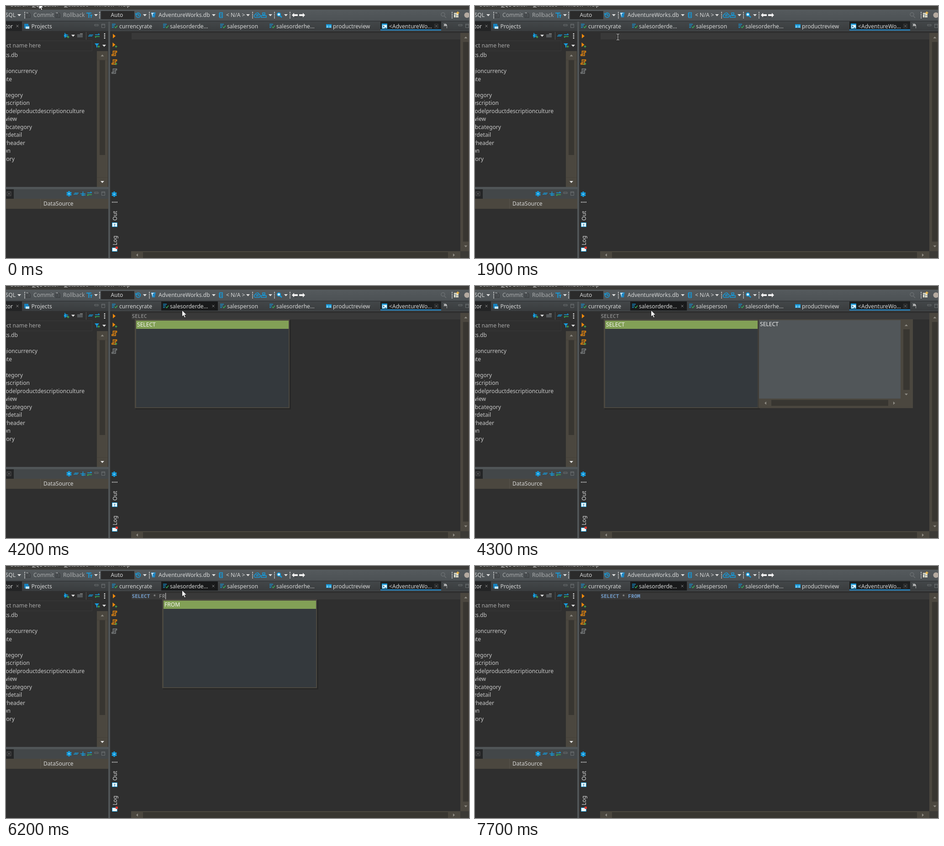
Recreate the animation shown at these times as an HTML page. Size 1014 by 553 pixels, loop 8 s.

```html
<!DOCTYPE html>
<html lang="en">
<head>
<meta charset="utf-8">
<title>SQL editor completion</title>
<style>
  html, body { margin: 0; width: 100%; height: 100%; overflow: hidden; background: #2f2f2f; }
  svg { display: block; width: 100%; height: 100%; }
  text { font: 12.1px "Noto Sans", "Open Sans", sans-serif; fill: #d6d7d7; white-space: pre; }
  .code { font: 11.08px "Noto Sans Mono", "DejaVu Sans Mono", monospace; fill: #a5a5a5; }
  .key { font-weight: 700; fill: #729bc8; }
  .dim { fill: #a9abac; }
  .tree text { text-anchor: end; fill: #c9c9c9; }
  .line { fill: none; stroke-width: 1.5; }
  .blue { stroke: #159bdc; }
  .gray { stroke: #6c7072; }
  .track { fill: #4b473f; }
  .thumb { fill: #383631; }
</style>
</head>
<body>
<svg viewBox="0 0 1014 553" preserveAspectRatio="none">
  <defs>
    <linearGradient id="bar" x2="0" y2="1"><stop stop-color="#555a5d"/><stop offset="1" stop-color="#4c5154"/></linearGradient>
    <linearGradient id="strip" x2="0" y2="1"><stop stop-color="#434749"/><stop offset="1" stop-color="#393c3e"/></linearGradient>
    <path id="down" d="M-4-2h8l-4 4.5z" fill="#e4e4e4"/>
    <path id="dots" d="M0-7V8" stroke="#d4d5d5" stroke-width="2" stroke-dasharray="2 2"/>
    <g id="minmax" class="line gray" style="stroke-width:1"><path d="M-4-3.5h8v3h-8z"/><path d="M11.500-4.500h7v8h-7zM11.500-2.500h7"/></g>
    <path id="close" d="M-2.500-2.500l5 5m0-5l-5 5" stroke="#858585"/>
    <g id="check" class="line"><path class="blue" d="M0-4h8M0-.5h6M0 3h4"/><path d="M6 2l2 2 4-5" stroke="#35b45a"/></g>
    <g id="gear" fill="#159bdc"><circle r="4.500"/><path d="M0-6V6M-5.200-3L5.200 3M-5.200 3L5.200-3" class="blue" stroke-width="3"/><circle r="1.500" fill="#8fd4f5"/></g>
    <g id="swap" class="line"><path class="blue" d="M-5-2H4M2-4.500l3 2.500"/><path d="M5 2h-9M-3 4.500l-2-2.500" stroke="#35b45a"/></g>
    <path id="minus" class="line blue" d="M-5 1h9M-3-1.500h9"/>
    <g id="sheet" class="line"><path d="M-2.500 2v-7h8v2.500H3V5h-8V2.500h5.500"/><path d="M-.500-2h2M-.500.500h2"/></g>
    <path id="play" d="M-3-5l6 5-6 5z" fill="#f08a0c"/>
    <path id="plus" d="M0-2.500v5M-2.500 0h5" stroke="#4aae4f" stroke-width="1.300"/>
    <path id="doc" d="M-4-5h6l3 3v7h-9zM-2-1h4M-2 2h4" class="line"/>
  </defs>

  <rect width="1014" height="553" fill="#2f2f2f"/>

  <!-- menu and toolbar -->
  <rect width="1014" height="9" fill="#3c3b38"/>
  <rect y="8" width="1014" height="26" fill="url(#bar)"/>
  <rect y="32.500" width="1014" height="1.500" fill="#303335"/>
  <g><text x="10" y="1">Search</text><text x="57" y="1">SQL Editor</text><text x="127" y="1">Database</text><text x="192" y="1">Window</text><text x="246" y="1">Help</text></g>
  <path d="M57 2.500h8M127 2.500h8" stroke="#c8c8c8"/>
  <rect x="208" y="11" width="73" height="18" fill="#2b2b2b"/>
  <text x="21" y="24" text-anchor="end">SQL</text>
  <g id="downs"></g>
  <g id="seps"></g>
  <use href="#doc" x="48" y="20" stroke="#3a3d3f"/><use href="#doc" x="113" y="20" stroke="#3a3d3f"/>
  <path d="M44 15h5M109 15h5" stroke="#85898b" stroke-width="2"/>
  <text x="60" y="24" class="dim">Commit</text>
  <text x="125" y="24" class="dim">Rollback</text>
  <path d="M176 15.500h11M181.500 15v11M184 20h5M186.500 20v6" class="line blue" style="stroke-width:2"/>
  <text x="243" y="24" text-anchor="middle">Auto</text>
  <g class="line blue"><circle cx="289.500" cy="20" r="5"/><path d="M289.500 16.500V20.500h3M283 16l2 3 3-1"/></g>
  <path d="M318 14h10l-2 11h-6z" fill="#1b86c4"/><path d="M318 15l4 10-1-8 5-2z" fill="#e8eef2"/>
  <text x="334" y="24">AdventureWorks.db</text>
  <path d="M468 14.500h6v11h-6zM466 17h3M466 20h3M466 23h3M470 18h3M470 22h3" class="line blue"/>
  <text x="482" y="24">&lt; N/A &gt;</text>
  <path d="M546 25c-4-1-3-6 0-6 1-5 7-5 8-1 4 1 3 7 0 7zM549 23v-4h3v4" class="line blue"/>
  <path d="M562 15h5v4h-5zM559 21h11v4h-11zM564.500 19v3" class="line blue"/>
  <circle cx="597.500" cy="18.500" r="3.500" fill="#dff2fc" class="blue" stroke-width="2"/><path d="M600 21l4 4" class="line blue" style="stroke-width:2.500"/>
  <path d="M626 20l5-5v3h8v4h-8v3zM655 20l-5-5v3h-8v4h8v3z" fill="#f1f1f1"/>
  <path d="M630 24.500h9M643 24.500h6" stroke="#2a2c2d" opacity=".5"/>
  <g class="line gray"><circle cx="957" cy="18.500" r="4"/><path d="M960 22l4 4"/></g>
  <path d="M981 15h10v10h-10z" fill="#e5dfca"/><path d="M981 18h6M984.500 19v6M985 21.500h6" stroke="#5d7788"/><path d="M989.500 12v6M986.500 15h6" stroke="#f0ba48" stroke-width="2"/>
  <circle cx="1009.500" cy="20" r="6" fill="#b5aaa0"/>

  <!-- navigator -->
  <rect y="34" width="224" height="21" fill="url(#strip)"/>
  <rect y="34" width="35" height="21" fill="#232425"/>
  <text x="15" y="49" text-anchor="end">tor</text><use href="#close" x="25" y="44"/>
  <path d="M40 39h9v10h-9z" fill="#1683c0"/><path d="M43 43h8v7h-8z" fill="#bfe4f6"/><path d="M43 44h8" stroke="#1683c0" stroke-width="2"/>
  <text x="55.500" y="49">Projects</text>
  <use href="#minmax" x="198" y="44"/>
  <path d="M127 63l5-2v8l-5-2z" fill="#159bdc"/><path d="M132 63.500h4M132 66.500h4M129 62v-3M129 68v2" class="line blue"/><use href="#plus" x="136" y="68"/>
  <path d="M156 62h12v7h-12z" fill="#54585a"/><path d="M162 61h6" stroke="#777" stroke-width="2"/>
  <path d="M175.500 57v17" stroke="#555"/>
  <use href="#minus" x="185" y="65"/><use href="#swap" x="200" y="65"/>
  <path d="M216 60v12" stroke="#e2e2e2" stroke-width="2.500" stroke-dasharray="2.500 2"/>
  <path d="M-2 76.500H188.500V98.500H-2" fill="none" stroke="#393939"/>
  <text x="76" y="91" text-anchor="end" style="fill:#a7a7a7">ect name here</text>
  <path d="M194 82h10l-4 5v5l-2-2v-3z" fill="#159bdc"/><use href="#plus" x="203" y="89"/>
  <g class="tree" id="tree"></g>
  <rect class="track" x="199" y="99" width="24" height="298"/>
  <rect class="thumb" x="205" y="119" width="12" height="208"/>
  <path d="M199 118.500h24M199 376.500h24" stroke="#454139"/>
  <path d="M207.500 110.500h7l-3.500-4z" fill="#8e8b84"/><use href="#down" x="211" y="386"/>

  <!-- lower panel -->
  <rect y="397" width="228" height="5" fill="#505557"/>
  <rect y="402" width="224" height="21" fill="#434749"/>
  <rect y="402" width="17" height="21" fill="#242526"/><path d="M2 407.500h9v9H2z" fill="none" stroke="#555"/><use href="#close" x="6.500" y="412"/>
  <use href="#gear" x="138" y="412"/><use href="#minus" x="153" y="412"/>
  <path d="M163 412h11M168.500 407v10M165 415h9" class="line blue"/>
  <use href="#swap" x="183" y="412"/><use href="#minmax" x="198" y="412"/>
  <rect class="track" y="423" width="224" height="22"/><path d="M75.500 423v22" stroke="#57534a"/>
  <text x="82" y="438">DataSource</text>
  <rect x="224" y="34" width="4" height="519" fill="#505557"/>

  <!-- editor -->
  <rect x="228" y="34" width="786" height="21" fill="url(#strip)"/>
  <rect x="820" y="34" width="133" height="20" fill="#1d1f20"/>
  <rect x="820" y="51" width="133" height="3" fill="#2478ad"/>
  <rect id="hover" x="340" y="34" width="124" height="20" fill="#191a1b"/>
  <path d="M228 54.500h786" stroke="#4b5052"/>
  <g id="tabs"></g>
  <path d="M701 40h12v8h-12z" fill="#159bdc"/><path d="M702 44h4m2 0h4M702 46.500h4m2 0h4" stroke="#e4f4fc"/>
  <path d="M823.500 39.500h11v10h-11z" fill="#e9f5fb" stroke="#159bdc"/><path d="M823 40h12" stroke="#159bdc" stroke-width="3"/><path d="M825 43l3 2-3 2M829 48h4" class="line" stroke="#176994"/>
  <path d="M938.500 39.500h8v9h-8z" fill="none" stroke="#3a3a3a"/><use href="#close" x="942.500" y="44"/>
  <use id="hoverX" href="#close" x="454" y="44"/>
  <path d="M959 39l2.500 2.500-2.500 2.500M962 39l2.500 2.500-2.500 2.500" class="line" stroke="#ddd"/><text x="963" y="49" style="font-size:8px">1</text>
  <use href="#minmax" x="995" y="44"/>

  <use href="#play" x="237" y="66"/><use href="#play" x="236.500" y="85"/><use href="#plus" x="241" y="89"/>
  <use href="#sheet" x="237" y="104" stroke="#f08a0c"/><use href="#sheet" x="237" y="123" stroke="#f08a0c"/><use href="#plus" x="241" y="127"/>
  <use href="#sheet" x="237" y="143" stroke="#7f8384"/>
  <use href="#gear" x="237" y="413"/>
  <path d="M232 430.500h12" stroke="#d0d0d0" stroke-width="2" stroke-dasharray="2 1.330"/>
  <text transform="translate(243 471) rotate(-90)">Out</text>
  <text transform="translate(243 525) rotate(-90)">Log</text>
  <path d="M232.500 475.500h11v9h-11z" fill="#f1f7fa" stroke="#159bdc"/><path d="M236 479h4M238 479v5" stroke="#167bae"/>
  <path d="M232.500 530.500h11v8h-11z" fill="#f1f7fa" stroke="#159bdc"/><path d="M240 528h5v5h-5z" fill="#dc3b32"/>
  <rect x="275" y="59" width="720" height="14.500" fill="#393939"/>
  <rect class="track" x="995" y="59" width="19" height="479"/><rect class="thumb" x="1001" y="79" width="12" height="438"/>
  <path d="M1003.500 71h7l-3.500-4zM1003.500 525.500h7l-3.500 4z" fill="#8e8b84"/>
  <rect class="track" x="274" y="538" width="721" height="15"/><rect class="thumb" x="300" y="540" width="668" height="13"/>
  <rect x="995" y="538" width="19" height="15" fill="#3b3a36"/>
  <path d="M289 543v7l-4-3.500zM979 543v7l4-3.500z" fill="#8e8b84"/>
  <text class="code" x="275.500" y="70"><tspan id="w0"></tspan><tspan id="w1"></tspan><tspan id="w2"></tspan></text>
  <rect id="caret" y="59" width="1" height="14" fill="#e0e0e0"/>

  <!-- completion popup -->
  <g id="popup">
    <rect x="2" y="75" width="340" height="196" fill="#000" opacity=".18"/>
    <rect y="73" width="339" height="195" fill="#4b4840"/>
    <rect x="3" y="76" width="334" height="190" fill="#34393d"/>
    <rect x="3" y="76" width="334" height="18" fill="#82a056"/>
    <text class="word" x="5" y="89" style="fill:#f1f3ec"></text>
    <g id="help">
      <rect class="track" x="337" y="73" width="340" height="195"/>
      <rect x="340" y="75" width="310" height="172" fill="#515659"/>
      <path d="M338.500 73v195" stroke="#3d3b36" stroke-width="2"/>
      <rect class="thumb" x="656" y="95" width="14" height="133"/>
      <rect class="thumb" x="367" y="250" width="256" height="13"/>
      <path d="M659 88h7l-3.500-4zM659 236h7l-3.500 4zM356 253.500v7l-4-3.500zM634 253.500v7l4-3.500z" fill="#8e8b84"/>
      <text class="word" x="342" y="88" style="fill:#f0f0f0"></text>
    </g>
  </g>

  <path id="arrow" d="M0 0V14.500L3.300 11.500 5.500 16.500 8 15.400 5.800 10.500H10.300z" fill="#f4f4f4" stroke="#1c1c1c" stroke-width=".9"/>
  <g id="beam" fill="none"><path d="M-3-6.500h2.500L0-6 .500-6.500H3M0-6V6M-3 6.500h2.500L0 6l.500.500H3" stroke="#151515" stroke-width="2.800"/><path d="M-3-6.500h2.500L0-6 .500-6.500H3M0-6V6M-3 6.500h2.500L0 6l.500.500H3" stroke="#f0f0f0"/></g>
</svg>
<script>
const $ = id => document.getElementById(id);
const fill = (id, items, fn) => { $(id).innerHTML = items.map(fn).join(""); };

fill("downs", [[29, 20], [197, 20], [304, 20], [455, 20], [530, 20], [579, 20], [613, 20], [147, 65], [215, 87]],
  ([x, y]) => `<use href="#down" x="${x}" y="${y}"/>`);
fill("seps", [41, 205, 314, 540, 588, 622, 977], x => `<use href="#dots" x="${x}" y="20"/>`);
fill("tree", [
  ["ks.db", 26, 0], ["gioncurrency", 69, 2], ["ate", 13, 3], ["ategory", 37, 5], ["escription", 52, 6],
  ["odelproductdescriptionculture", 172, 7], ["view", 24, 8], ["bcategory", 57, 9], ["rdetail", 35, 10],
  ["rheader", 42, 11], ["on", 10, 12], ["tory", 19, 13]
], ([s, x, row]) => `<text x="${x}" y="${112 + row * 17.5}">${s}</text>`);
fill("tabs", [
  ["currencyrate", 248, 232], ["salesorderde...", 359, 344], ["salesperson", 484, 469],
  ["salesorderhe...", 592, 577], ["productreview", 716], ["&lt;AdventureWo...", 839]
], ([s, x, icon]) => `<text x="${x}" y="49">${s}</text>` +
  (icon ? `<use href="#check" x="${icon}" y="44"/>` : ""));

const LOOP = 8000, COL = 6.65;
// time, typed words, caret column (-1 = off), completion word, help panel
const typing = [
  [0, ["", "", ""], -1, "", false],
  [3300, ["S", "", ""], -1, "SELECT", false],
  [3500, ["", "", ""], -1, "", false],
  [3700, ["S", "", ""], 1, "", false],
  [3900, ["SE", "", ""], -1, "SELECT", false],
  [4000, ["SELE", "", ""], -1, "SELECT", false],
  [4200, ["SELEC", "", ""], -1, "SELECT", false],
  [4300, ["SELECT", "", ""], -1, "SELECT", true],
  [4500, ["SELECT", "", ""], -1, "", false],
  [5500, ["SELECT", " * ", ""], 9, "", false],
  [5700, ["SELECT", " * ", "F"], -1, "", false],
  [6000, ["SELECT", " * ", "F"], 10, "FROM", false],
  [6200, ["SELECT", " * ", "FR"], 11, "FROM", false],
  [6500, ["SELECT", " * ", "FR"], 11, "FROM", true],
  [7200, ["SELECT", " * ", "FROM"], 13, "FROM", true],
  [7400, ["SELECT", " * ", "FROM"], -1, "FROM", true],
  [7500, ["SELECT", " * ", "FROM"], -1, "", false]
];
// time, x, y, pointer shape
const pointer = [
  [0, 72, -7, "arrow"], [100, 86, 6, "arrow"],
  [300, 128, 20, "arrow"], [400, 178, 42, "arrow"], [500, 226, 64, "arrow"],
  [600, 274, 83, "beam"], [700, 300, 93, "beam"],
  [1500, 301, 91, "beam"], [1600, 303, 86, "beam"], [1700, 306, 79, "beam"],
  [1800, 310, 73, "beam"], [1900, 313, 68, "beam"],
  [2400, 349, 64, "beam"], [2500, 384, 57, "beam"],
  [3300, 385.5, 53, "arrow"], [5800, 0, 0, ""], [6000, 385.5, 53, "arrow"], [7700, 0, 0, ""]
];

const at = (steps, t) => steps.findLast(s => s[0] <= t);
const show = (id, on) => { $(id).style.display = on ? "" : "none"; };
const move = (id, x, y) => $(id).setAttribute("transform", `translate(${x} ${y})`);

function draw(t) {
  const [, words, caret, word, help] = at(typing, t);
  words.forEach((s, i) => {
    const el = $("w" + i);
    el.textContent = s;
    const done = (s === "SELECT" && t >= 4500) || s === "FROM";
    el.setAttribute("class", done ? "key" : "");
  });
  show("caret", caret >= 0);
  $("caret").setAttribute("x", 276 + Math.max(caret, 0) * COL);

  show("popup", word);
  show("help", help);
  move("popup", word === "FROM" ? 342 : 282, 0);
  document.querySelectorAll(".word").forEach(el => { el.textContent = word; });
  show("hover", t >= 3300);
  show("hoverX", t >= 3300);

  const [, x, y, shape] = at(pointer, t);
  for (const id of ["arrow", "beam"]) {
    show(id, id === shape);
    move(id, x, y);
  }
}

const start = performance.now();
function tick() {
  draw((performance.now() - start) % LOOP);
  requestAnimationFrame(tick);
}
tick();
</script>
</body>
</html>
```
